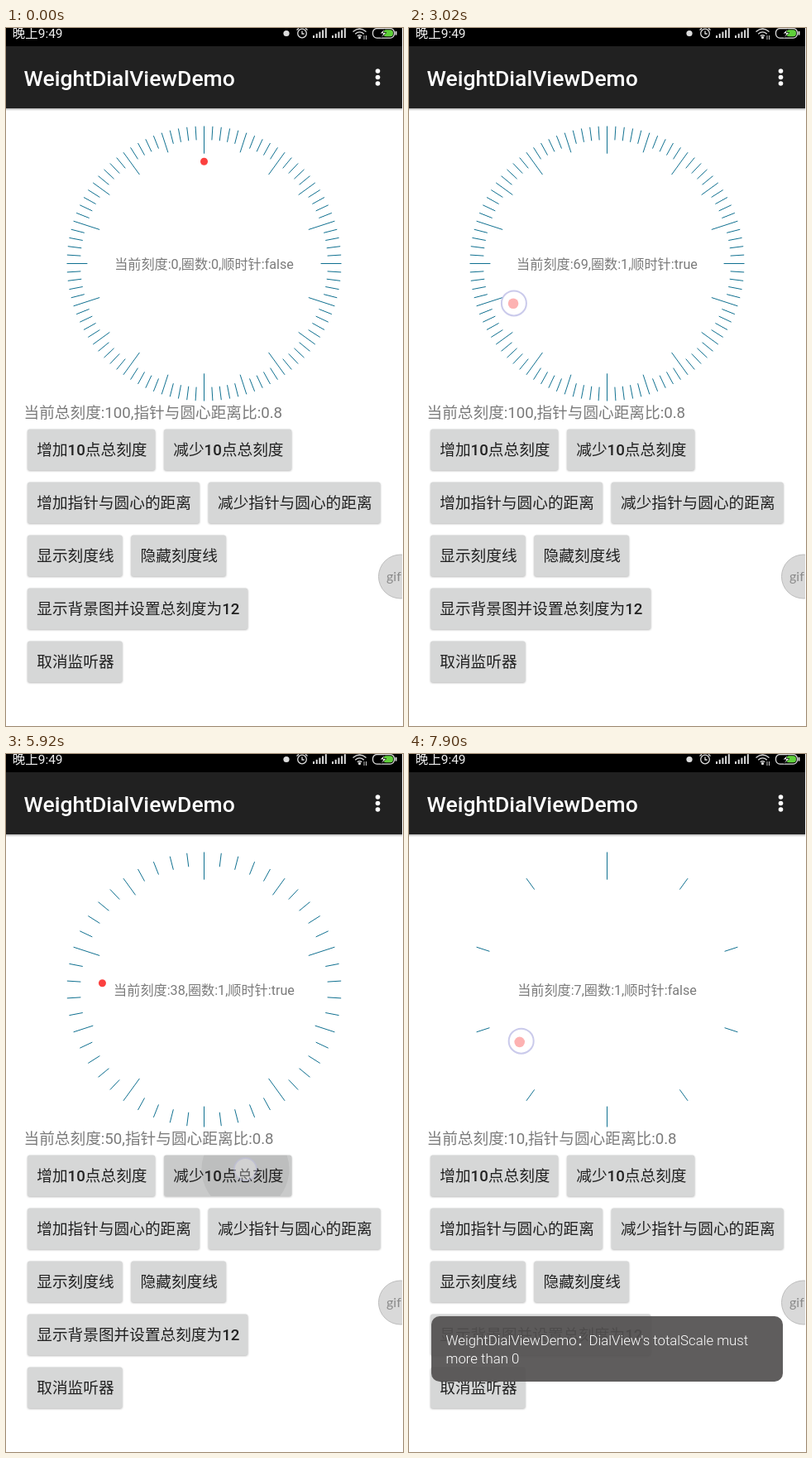
Write an HTML page that moves like this. It is 480 px wide and 843 px high and loops after 8000 ms.

```html
<!DOCTYPE html>
<html lang="zh-CN">
<head>
<meta charset="utf-8">
<title>WeightDialViewDemo</title>
<style>
html, body { margin: 0; width: 100%; height: 100%; overflow: hidden; background: #fff; }
svg { display: block; width: 100vw; height: 100vh; }
text { font-family: Roboto, "Noto Sans CJK SC", "Noto Sans CJK", sans-serif; white-space: pre; }
.btn { fill: #d6d7d7; filter: drop-shadow(0 1px 1px rgba(0,0,0,.28)); }
.cap { font-size: 18.67px; fill: #212121; }
.cap tspan { font-weight: 500; }
.grey { fill: #7b7b7b; }
.toast text { font-size: 16.8px; font-weight: 300; fill: #fff; }
</style>
</head>
<body>
<svg viewBox="0 0 480 843" xmlns="http://www.w3.org/2000/svg">
  <defs>
    <linearGradient id="shade" x1="0" y1="0" x2="0" y2="1">
      <stop offset="0" stop-color="#000" stop-opacity=".3"/>
      <stop offset="1" stop-color="#000" stop-opacity="0"/>
    </linearGradient>
    <clipPath id="minusClip"><rect x="191.2" y="484.5" width="154.5" height="49.5" rx="2.7"/></clipPath>
  </defs>
  <rect width="480" height="843" fill="#fff"/>

  <rect y="97" width="479" height="3" fill="url(#shade)"/>
  <rect y="22" width="479" height="75" fill="#212121"/>
  <rect width="479" height="22" fill="#000"/>
  <text x="21.5" y="69.5" font-size="26.5" font-weight="500" fill="#fff">WeightDialViewDemo</text>
  <g fill="#fff">
    <circle cx="449.5" cy="52" r="2.8"/><circle cx="449.5" cy="59.5" r="2.8"/><circle cx="449.5" cy="67" r="2.8"/>
  </g>

  <text x="7.7" y="12.3" font-size="15.5" fill="#eee">晚上9:49</text>
  <g id="status" fill="none" stroke="#ddd" stroke-width="1.3">
    <circle cx="339" cy="6.5" r="3.6" fill="#ddd" stroke="none"/>
    <circle cx="358" cy="6.5" r="5.3"/>
    <path d="M358 3.5v3.5h2.6M351.5 2.5l2.5-2.2M364.5 2.5L362 .3"/>
    <path d="M419.5 4.5q8-7 16 0M422.2 7.2q5.3-4.6 10.6 0M424.8 9.8q2.7-2.3 5.4 0"/>
    <circle cx="427.5" cy="11.5" r="1" fill="#ddd"/>
    <path d="M433 9v5M435.5 9v5" stroke-width=".9"/>
    <rect x="443.5" y=".6" width="26" height="11.5" rx="5"/>
    <path d="M471.5 4v4.5" stroke-width="2"/>
    <rect x="456" y="2.3" width="12" height="8" rx="3.5" fill="#5fd03a" stroke="none"/>
    <path d="M458 1l-6 5.8h4l-2.5 5 6.5-6.3h-4z" fill="#fff" stroke="#000" stroke-width=".7"/>
  </g>

  <path id="ticks" fill="none" stroke="#0f7090"/>
  <circle id="dot" fill="#fb403f"/>
  <text id="label" class="grey" x="239.5" y="290.8" font-size="16.15" text-anchor="middle"></text>
  <text id="info" class="grey" x="21.5" y="471" font-size="18.67"></text>

  <g id="buttons"></g>
  <g clip-path="url(#minusClip)">
    <rect id="press" x="191" y="484" width="156" height="51" opacity=".06"/>
    <circle id="ripple" r="53" opacity=".06"/>
  </g>
  <g id="captions"></g>

  <g class="toast" id="toast">
    <rect x="27" y="679" width="425" height="79" rx="10" fill="#525050" fill-opacity=".92"/>
    <text x="44.5" y="714.3">WeightDialViewDemo：</text>
    <text x="217.5" y="714.3">DialView's totalScale must</text>
    <text x="44.5" y="736">more than 0</text>
  </g>

  <circle cx="477" cy="662.5" r="26.5" fill="#d9d9d9" stroke="#bdbdbd"/>
  <text x="460" y="667.5" font-size="16" fill="#8a8a8a" style="font-family:Lato,sans-serif">gif</text>
  <rect x="479" width="1" height="843" fill="#fff"/>

  <circle id="touch" fill="#fff" fill-opacity=".6" stroke="#bdbde6" stroke-opacity=".8" stroke-width="2"/>
</svg>
<script>
const LOOP = 8000, STEP = 93.9;  // the screen refreshes once per step
const CX = 239.5, CY = 284.5, R = 166, DOT_R = 123.3;

const $ = id => document.getElementById(id);
const set = (el, attrs) => { for (const k in attrs) el.setAttribute(k, attrs[k]); };
const say = (el, s) => { if (el.textContent !== s) el.textContent = s; };
const progress = (t, from, to) => Math.min(1, Math.max(0, (t - from) / (to - from)));
const smooth = u => u * u * (3 - 2 * u);
const mix = (a, b, u) => a + (b - a) * u;

function add(parent, tag, attrs) {
  const el = document.createElementNS("http://www.w3.org/2000/svg", tag);
  set(el, attrs);
  return parent.appendChild(el);
}

function polar(deg, r) {
  const a = deg * Math.PI / 180;
  return [CX + r * Math.sin(a), CY - r * Math.cos(a)];
}

// buttons flow along each row, as wide as their captions
[
  ["增加10点总刻度", "减少10点总刻度"],
  ["增加指针与圆心的距离", "减少指针与圆心的距离"],
  ["显示刻度线", "隐藏刻度线"],
  ["显示背景图并设置总刻度为12"],
  ["取消监听器"]
].forEach((row, i) => {
  const y = 484.5 + i * 64;
  let x = 26;
  for (const s of row) {
    const width = [...s].reduce((w, c) => w + (/\d/.test(c) ? 10.5 : 18.67), 21.3);
    add($("buttons"), "rect", { class: "btn", x, y, width, height: 49.5, rx: 2.7 });
    const cap = add($("captions"), "text", { class: "cap", x: x + 11.3, y: y + 31.3 });
    cap.innerHTML = s.replace(/\d+/, "<tspan>$&</tspan>");
    x += width + 10.67;
  }
});

// two signal meters
for (const x of [372, 395])
  for (let i = 0; i < 5; i++)
    add($("status"), "path", { d: `M${x + i * 3.7} 12v${-3 - i * 2.2}`, "stroke-width": 2 });

// finger drags: time span, lift and rest times, angles, distances from the centre
const drags = [
  { from: 280, to: 1500, lift: 2060, rest: 2150, a: 0, b: 427.8, r0: 127, r1: 176, dip: 60 },
  { from: 2580, to: 3107, lift: 3190, rest: 3520, a: 428.4, b: 626.4, r0: 132, r1: 110, dip: 0 },
  { from: 7410, to: 7900, lift: LOOP * 2, rest: LOOP * 2, a: 648, b: 599, r0: 123, r1: 121, dip: 0 }
];

// each tap takes 10 off the total and snaps the pointer to the new scale
const taps = [4820, ...Array.from({ length: 9 }, (_, i) => 5360 + 184 * i)];
const states = [{ total: 100, value: 74 }];
while (states.length < 10) {
  const last = states[states.length - 1], total = last.total - 10;
  states.push({ total, value: Math.round(last.value / last.total * total) });
}

let drawn = 0;
function drawTicks(total) {
  if (total === drawn) return;
  drawn = total;
  let d = "";
  for (let i = 0; i < total; i++) {
    const len = i % 10 === 0 ? 0.2 : i % 5 === 0 ? 0.15 : 0.1;
    const p = r => polar(i * 360 / total, r).map(v => v.toFixed(2)).join(" ");
    d += `M${p(R)}L${p(R * (1 - len))}`;
  }
  set($("ticks"), { d });
}

function render(time) {
  const t = Math.floor(time / STEP) * STEP;
  const count = taps.filter(c => c <= t).length;
  const { total, value } = states[Math.min(count, 9)];
  const drag = drags.filter(d => d.from <= t).pop() || drags[0];
  const tapping = t >= 4400 && t < drags[2].from;

  const s = smooth(progress(t, drag.from, drag.to));
  const turn = mix(drag.a, drag.b, s);
  const deg = tapping && count ? value / total * 360 : turn;
  const held = t >= drag.from && t < drag.rest;
  const [cx, cy] = polar(deg, DOT_R);
  drawTicks(total);
  set($("dot"), { cx, cy, r: held ? 6.3 : 4.5 });

  const scale = Math.round(deg % 360 / 360 * total) % total;
  const clockwise = s === 0 ? drag === drags[2] : drag.b > drag.a;
  say($("label"), `当前刻度:${scale},圈数:${turn >= 360 ? 1 : 0},顺时针:${clockwise}`);
  say($("info"), `当前总刻度:${total},指针与圆心距离比:0.8`);

  const reach = mix(drag.r0, drag.r1, s ** 8) - drag.dip * s * (1 - s);
  let [x, y] = polar(turn, reach), r = 15;
  let opacity = t < drag.from ? 0 : progress(t, drag.lift, drag.lift - 150);
  let fading = false;
  if (tapping) {
    const drift = progress(t, 5450, 6385);
    fading = count > 0 && t - taps[count - 1] < 96;
    x = mix(295.3, 283.5, drift);
    y = mix(497.3, 505.5, drift);
    r = fading ? 13.5 : 15;
    opacity = fading ? 0.5 : count < 10 ? 1 : 0;
  }
  set($("touch"), { cx: x, cy: y, r, opacity });
  set($("ripple"), { cx: x, cy: y, visibility: fading ? "visible" : "hidden" });
  set($("press"), { visibility: t > 4600 && t < 7220 ? "visible" : "hidden" });

  const rise = progress(t, 7040, 7230);
  set($("toast"), {
    opacity: rise ? mix(0.55, 1, rise) : 0,
    transform: `translate(0 ${36 * (1 - rise) ** 2.85})`
  });
}

function loop() {
  render(performance.now() % LOOP);
  requestAnimationFrame(loop);
}
loop();
</script>
</body>
</html>
```
